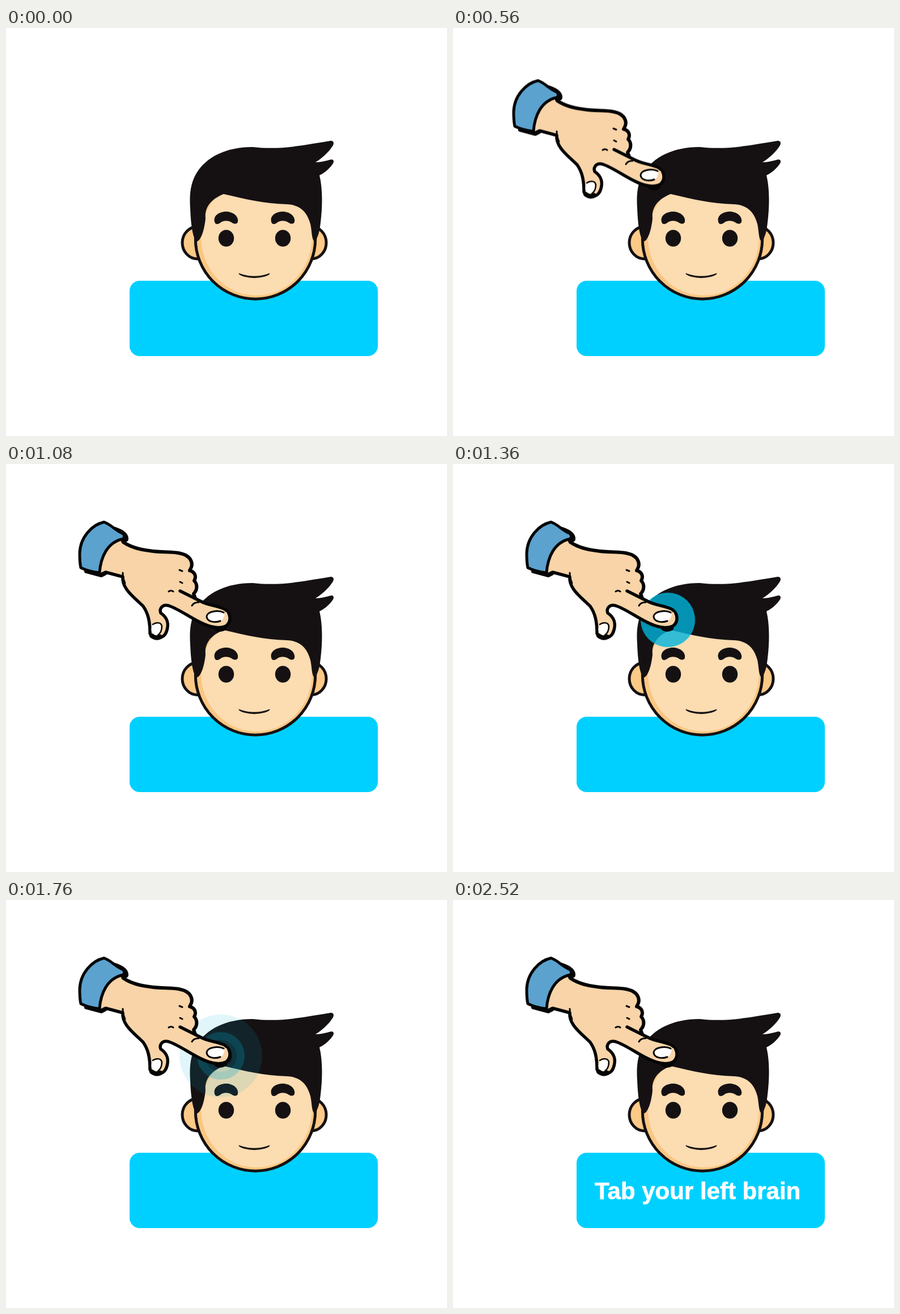
These frames come from a looping animation (778x720 px, 4800 ms). An HTML page without scripts:

```html
<!DOCTYPE html>
<html lang="en">
<head>
<meta charset="utf-8">
<title>Tab your left brain</title>
<style>
html, body { margin: 0; width: 100%; height: 100%; overflow: hidden; background: #fff; }
svg { display: block; width: 100vw; height: 100vh; }
.ink { fill: #151113; }
.line { fill: none; stroke: #050505; stroke-linecap: round; stroke-linejoin: round; }
.hand, .disc, .rings, .label { animation: 4.8s linear infinite; }
.hand { animation-name: point; }
.disc, .rings { transform-origin: 379px 275px; }
.disc { animation-name: pulse; }
.rings { animation-name: echo; }
.label { font: bold 42px "Liberation Sans", Arial, sans-serif; fill: #fff; stroke: #fff;
  stroke-width: .7; stroke-linejoin: round; animation-name: wipe; }

@keyframes point {
  0% { opacity: 0; transform: translate(-64.5px, 0); animation-timing-function: steps(5); }
  4.1667% { opacity: 1; transform: translate(-64.5px, -27px); animation-timing-function: steps(14); }
  15.8333%, 100% { opacity: 1; transform: none; }
}
/* disc radius is 73 at scale 1 */
@keyframes pulse {
  0%, 23.3333% { opacity: .8; transform: scale(0); animation-timing-function: steps(6); }
  28.3333% { opacity: .8; transform: scale(.657); animation-timing-function: steps(4); }
  31.6667% { opacity: .45; transform: scale(1.08); animation-timing-function: steps(4); }
  35% { opacity: .18; transform: scale(1); animation-timing-function: steps(2); }
  36.6667% { opacity: .12; transform: scale(1); animation-timing-function: steps(2); }
  38.3333%, 100% { opacity: 0; transform: scale(1); }
}
@keyframes echo {
  0%, 28.3333% { opacity: 0; transform: scale(.6); animation-timing-function: steps(8); }
  35%, 36.6667% { opacity: 1; transform: scale(1); animation-timing-function: steps(2); }
  38.3333%, 100% { opacity: 0; transform: scale(1); }
}
@keyframes wipe {
  0%, 39.1667% { clip-path: inset(-10px 100% -10px 0); animation-timing-function: steps(16); }
  52.5%, 100% { clip-path: inset(-10px 0 -10px 0); }
}
</style>
</head>
<body>
<svg viewBox="0 0 778 720">
  <defs>
    <g id="feature" class="ink">
      <path d="M368 342C365 330 378 324 388 324C400 324 411 332 409 342C407 348 400 345 397 342.500C391 339.500 384 339.500 379 343C374 347 369 347 368 342Z"/>
      <ellipse cx="388.500" cy="371" rx="13.700" ry="14.800"/>
    </g>
  </defs>

  <rect x="218" y="446" width="438" height="133" rx="18" fill="#00d0ff"/>

  <g stroke="#151113" stroke-width="5">
    <ellipse cx="338" cy="379" rx="27" ry="28.500" fill="#fdc987"/>
    <ellipse cx="538.500" cy="379" rx="26.500" ry="28.500" fill="#fdc987"/>
    <circle cx="440" cy="372.500" r="105.700" fill="#fbc681"/>
  </g>
  <ellipse cx="442" cy="369" rx="98" ry="103" fill="#fcdcb1"/>
  <path class="ink" d="M336 377C329 369 326 345 325 318C323 290 327 272 335 258C352 228 388 210 435 210C485 216 528 206 573 199C578 199 579 203 577 207C569 220 557 230 546 237C556 237 565 234 574 232C578 232 579 235 577 239C571 248 563 255 553 260C558 280 559 310 555 343Q553 366 545 377C539 374 540 360 537 346C531 324 519 312 495 311C455 310 423 302 384 293C362 302 350 316 352 336C350 356 344 376 336 377Z"/>
  <use href="#feature"/>
  <use href="#feature" x="100"/>
  <path class="ink" d="M410.500 432.500Q438 443 465.500 432.500Q466 436 456 438.800Q438 443.500 420 438.800Q410 436 410.500 432.500Z"/>

  <circle class="disc" cx="379" cy="275" r="73" fill="#00b4dc"/>
  <g class="rings" fill="none" stroke="#00a5c8">
    <circle cx="379" cy="275" r="35" stroke-width="14" opacity=".25"/>
    <circle cx="379" cy="275" r="24" stroke-width="8" opacity=".12"/>
    <circle cx="379" cy="275" r="20" fill="#151113" stroke="none" opacity=".35"/>
  </g>

  <g class="hand">
    <path fill="#f8d4a8" d="M207 138C222 148 238 151 253 153C275 157 302 153 317 161C328 167 329 177 327 182L324 188C332 190 337 197 332 206C338 212 338 222 331 229L334 237L345 243C358 250 376 250 387 257C397 264 398 279 388 286C376 292 357 287 342 279C325 271 303 255 287 250C276 247 270 255 273 263C285 271 288 283 283 296C278 310 259 311 254 299C254 278 251 264 242 251C226 235 204 220 206 199L168 191C169 165 180 136 207 131Z"/>
    <path class="line" stroke-width="6" d="M207 138C222 148 238 151 253 153C275 157 302 153 317 161C328 167 329 177 327 182L324 188C332 190 337 197 332 206C338 212 338 222 331 229L334 237"/>
    <path class="line" stroke-width="5.500" d="M307 224L345 243C358 250 376 250 387 257C397 264 398 279 388 286C376 292 357 287 342 279C325 271 303 255 287 250C276 247 270 255 273 263C285 271 288 283 283 296C278 310 259 311 254 299C254 278 251 264 242 251C226 235 204 220 206 199L176 191"/>
    <path class="line" stroke-width="8" d="M371 290Q377 294 385 290M257 303Q265 309 272 305"/>
    <path class="line" stroke-width="3" d="M306 187L311 189M307 208L311 210M287 225Q291 222 295 225M328 250Q331 244 340 244M206 192Q206 201 210 210"/>
    <ellipse cx="371" cy="269" rx="16" ry="9" fill="#fff"/>
    <path fill="#f8d4a8" d="M390 262L390 278L378 279Q383 276 387 262Z"/>
    <path class="line" stroke-width="3" d="M384 262C374 257 355 260 354 269C354 278 368 281 378 277"/>
    <ellipse cx="265" cy="291" rx="8.500" ry="10.500" transform="rotate(15 265 291)" fill="#fff"/>
    <path class="line" stroke-width="2.500" d="M259 283C266 278 274 280 275 286C275 293 272 299 268 302"/>

    <path class="line" stroke-width="8" d="M192 115Q213 122 212 133L207 136M142 189L168 196L174 193"/>
    <path fill="#5ba2cf" stroke="#050505" stroke-width="5" stroke-linejoin="round" d="M173 102.500C152 107 130.500 129 130 158Q130 174 132 183Q146 190 165 192C167 165 178 138 207 132Q210 128 207 123C192 117 186 107 173 102.500Z"/>
  </g>

  <text class="label" x="250" y="527.500">Tab your left brain</text>
</svg>
</body>
</html>
```
